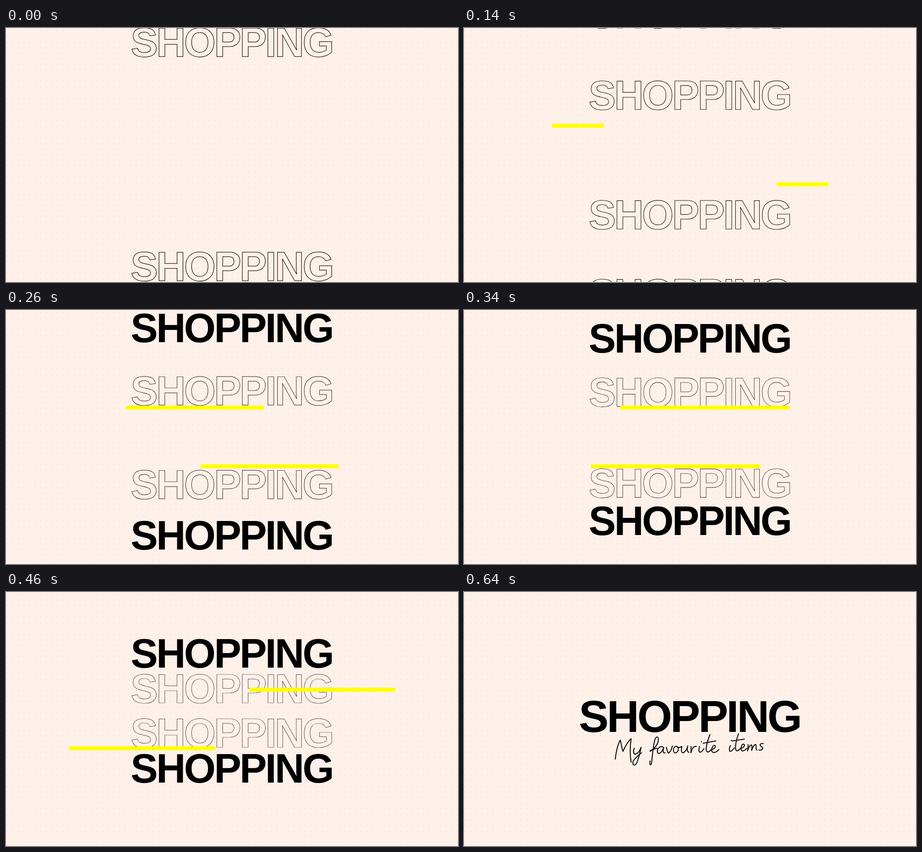
An HTML page that plays this animation: 998 px wide and 561 px high, repeating every 1.08 s.

```html
<!DOCTYPE html>
<html lang="en">
<head>
<meta charset="utf-8">
<title>Shopping</title>
<style>
  html, body { margin: 0; width: 100%; height: 100%; overflow: hidden; background: #fef1e9; }
  svg { display: block; width: 100%; height: 100%; }
  .word {
    font: bold 90px "Liberation Sans", Arial, Helvetica, sans-serif;
    letter-spacing: -3.65px;
    font-kerning: none;
  }
  .line { fill: none; stroke: #1d1512; }
  .solid { fill: #000; stroke: none; }
  .script { fill: none; stroke: #0a0808; stroke-width: 2.1; stroke-linecap: round; stroke-linejoin: round; }
  .bar { fill: #ff0; }
</style>
</head>
<body>
<svg viewBox="0 0 998 561">
  <defs>
    <pattern id="dots" width="12.43" height="12.44" patternUnits="userSpaceOnUse" patternTransform="translate(-4.2 -.2)">
      <circle cx="6.2" cy="6.2" r=".75" fill="#dccdc6"/>
    </pattern>
  </defs>
  <rect width="998" height="561" fill="#fef1e9"/>
  <rect width="998" height="561" fill="url(#dots)"/>
  <g id="words"></g>
  <g id="script" class="script" role="img" aria-label="My favourite items"></g>
  <rect id="barTop" class="bar" y="211.5" height="8.7"/>
  <rect id="barLow" class="bar" y="340.8" height="8.7"/>
</svg>
<script>
const NS = "http://www.w3.org/2000/svg";
const LOOP = 1080, STEP = 20;
const ENTER = 120, FILL = 260, TITLE = 580, BARS_IN = 100, BARS_OUT = 640;
const el = id => document.getElementById(id);

function add(parent, tag, attrs) {
  const node = parent.appendChild(document.createElementNS(NS, tag));
  for (const k in attrs) node.setAttribute(k, attrs[k]);
  return node;
}

// Smooth curve through [time, value] keys that never overshoots.
function curve(...keys) {
  const n = keys.length - 1;
  const slope = i => (keys[i + 1][1] - keys[i][1]) / (keys[i + 1][0] - keys[i][0]);
  const tangent = i => {
    if (i === 0) return slope(0);
    if (i === n) return slope(n - 1);
    const a = slope(i - 1), b = slope(i);
    return a * b > 0 ? 2 * a * b / (a + b) : 0;
  };
  return t => {
    if (t <= keys[0][0]) return keys[0][1];
    if (t >= keys[n][0]) return keys[n][1];
    let i = 0;
    while (t > keys[i + 1][0]) i++;
    const [t0, a] = keys[i], [t1, b] = keys[i + 1];
    const d = t1 - t0, u = (t - t0) / d, v = 1 - u;
    return a * v * v * (1 + 2 * u) + b * u * u * (3 - 2 * u)
      + d * u * v * (v * tangent(i) - u * tangent(i + 1));
  };
}

// Vertical centres of the words.
const innerTop = curve([60, 32], [80, 90], [200, 176], [340, 182], [400, 186], [540, 275]);
const innerLow = curve([60, 527], [80, 466], [200, 389], [340, 383], [400, 343], [540, 275]);
const outerTop = curve([120, -50], [200, 20], [340, 63], [400, 93], [540, 201]);
const outerLow = curve([120, 610], [200, 526], [340, 466], [400, 423], [540, 351]);
const lineWidth = curve([60, 1.25], [200, 1.05], [340, .8], [540, .7]);

// Edges of the upper bar; the lower one is its mirror image.
const barTail = curve([100, 180], [200, 219], [340, 345], [400, 408], [540, 748], [600, 872], [620, 908]);
const barHead = curve([100, 215], [200, 445], [340, 719], [400, 810], [540, 909], [600, 936], [620, 949]);

const word = () => {
  const node = add(el("words"), "text", { class: "word", x: -223.7, y: 31 });
  node.textContent = "SHOPPING";
  return node;
};
const [inA, inB, outA, outB, title] = Array.from({ length: 5 }, word);

function place(node, y, type, scale = 1) {
  node.setAttribute("class", "word " + type);
  node.setAttribute("transform", `translate(499 ${y}) scale(${scale})`);
}

function show(node, on) {
  node.setAttribute("visibility", on ? "visible" : "hidden");
}

// Handwriting, a few letters to a stroke group.
const script = [
  "M334 369C336 352 340 336 345 327C347 333 348 344 351 352C356 341 363 329 369 324C367 338 366 358 369 376",
  "M376 345C373 352 374 359 379 358C385 356 389 349 391 343C388 356 385 374 379 381C374 385 371 379 374 373C378 366 386 360 392 355",
  "M411 352C418 348 427 339 429 329C430 318 424 317 421 328C417 343 416 365 414 378C412 386 409 380 411 373M411 350L426 345",
  "M440 343C434 338 426 346 427 353C428 360 436 357 441 343C439 352 439 357 444 355M447 343C448 349 450 355 452 356C456 352 459 346 460 340",
  "M470 341C463 339 460 352 465 355C472 357 477 345 470 341C472 345 476 344 481 341C479 349 480 356 484 355C489 353 493 346 494 340C492 348 493 354 497 354",
  "M501 341C502 346 501 352 501 355C503 347 507 340 513 341M520 341C518 348 518 354 522 354C526 352 528 349 530 346M524 331l.5-.5",
  "M543 315C538 328 534 343 535 350C537 356 542 353 546 348C552 348 557 342 554 339C549 337 544 350 549 354C554 356 559 352 563 348M528 334L556 329",
  "M588 339C585 346 585 353 589 352C593 350 595 347 597 344M590 328l.5-.5",
  "M606 313C602 325 598 340 600 348C602 353 607 350 611 345C617 345 621 339 618 336C613 335 609 347 614 351C618 352 622 348 625 345M592 329L619 325",
  "M627 337C628 342 627 347 626 351C628 344 632 337 635 338C637 341 635 346 635 350C637 344 641 336 644 337C647 340 642 348 647 349M661 335C655 333 651 338 656 341C662 344 660 350 651 349"
];
script.forEach(d => add(el("script"), "path", { d }));

place(title, 274.5, "solid", 1.0975);

function draw(ms) {
  const t = Math.floor(ms / STEP) * STEP;
  const final = t >= TITLE;
  const outer = t < FILL ? "line" : "solid";

  place(inA, innerTop(t), "line");
  place(inB, innerLow(t), "line");
  place(outA, outerTop(t), outer);
  place(outB, outerLow(t), outer);
  el("words").setAttribute("stroke-width", lineWidth(t));

  show(inA, !final);
  show(inB, !final && t < 540);
  show(outA, !final && t >= ENTER);
  show(outB, !final && t >= ENTER);
  show(title, final);
  show(el("script"), final);

  const tail = barTail(t), head = barHead(t);
  const bars = t >= BARS_IN && t < BARS_OUT;
  for (const [id, x] of [["barTop", tail], ["barLow", 999.3 - head]]) {
    el(id).setAttribute("x", x);
    el(id).setAttribute("width", head - tail);
    show(el(id), bars);
  }
}

const start = performance.now();
function tick() {
  draw((performance.now() - start) % LOOP);
  requestAnimationFrame(tick);
}
tick();
</script>
</body>
</html>
```
